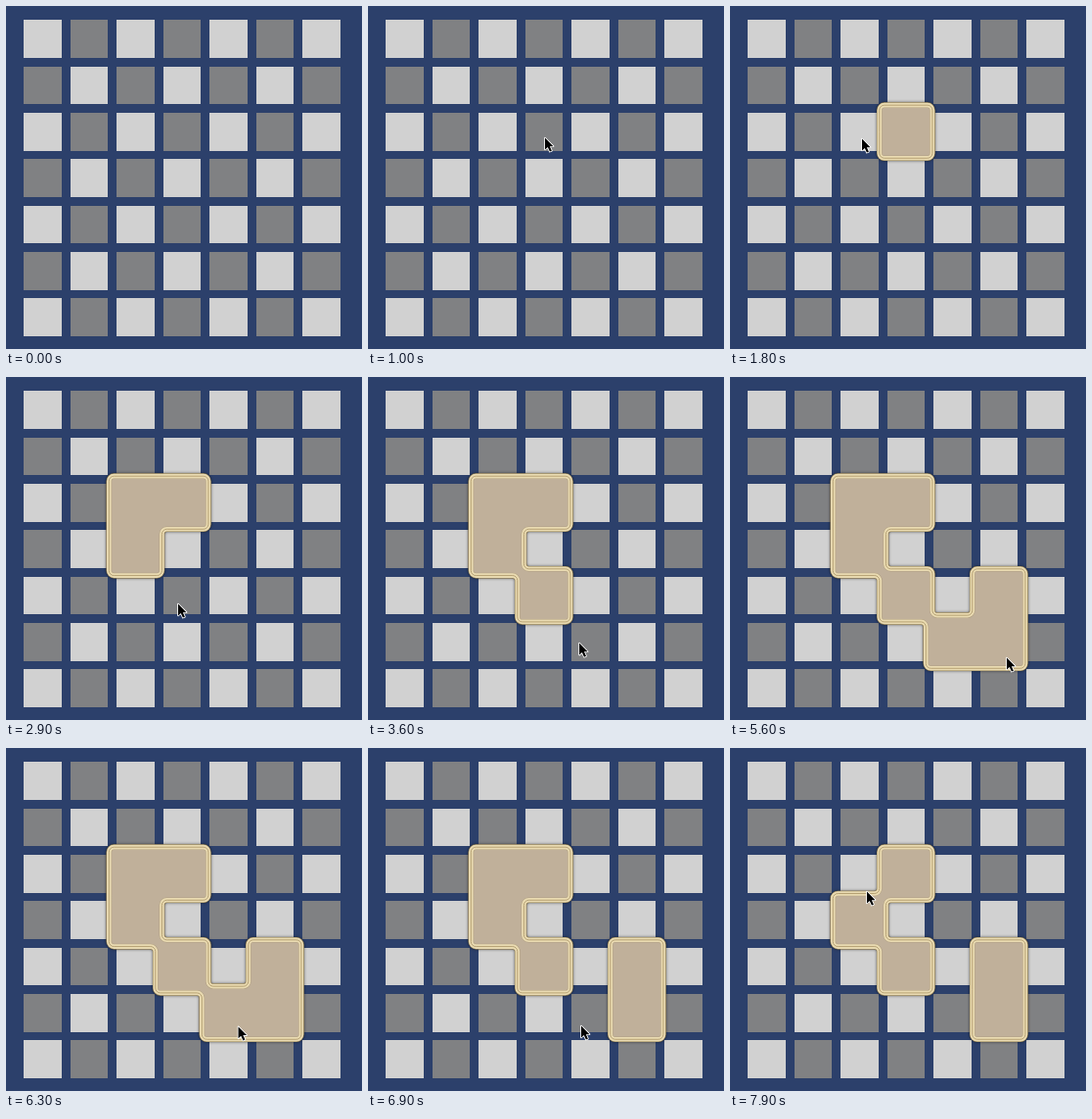
An HTML page with a canvas that plays this animation: 364x350 px, repeating every 8000 ms.

```html
<!DOCTYPE html>
<html lang="en">
<head>
<meta charset="utf-8">
<title>Tile board</title>
<style>
  html, body { margin: 0; width: 100%; height: 100%; overflow: hidden; background: #2c406b; }
  canvas { display: block; }
</style>
</head>
<body>
<canvas id="board" width="364" height="350"></canvas>
<script>
const ctx = document.getElementById('board').getContext('2d');
const LOOP = 8000, STEP = 100;
const SIZE = 38.7, GROW = 7.7, RADIUS = 5;
const X0 = 18, Y0 = 14.2, DX = 47.5, DY = 47.33;
const APPEAR = 600, REST = 200;

// Time and place of each click; a click toggles the tile below it
const clicks = [
  [1200, 180, 133], [2000, 134, 134], [2400, 134, 178],
  [3100, 175, 230], [4000, 225, 280], [4700, 272, 212],
  [5600, 282, 285], [6900, 217, 282], [7900, 139, 145]
];

// Lattice lines: odd numbers are left/top tile edges, even ones right/bottom
const line = (k, start, pitch) => k % 2
  ? start + pitch * (k + 1) / 2 - GROW
  : start + pitch * (k - 2) / 2 + SIZE + GROW;

function tilesAt(t) {
  const on = new Map();
  for (const [time, x, y] of clicks) {
    if (t < time) break;
    const c = Math.floor((x - X0) / DX), r = Math.floor((y - Y0) / DY);
    const key = c + ',' + r;
    if (!on.delete(key)) on.set(key, [c, r]);
  }
  return [...on.values()];
}

function outlines(tiles) {
  const filled = new Set(), next = new Map(), loops = [];
  const key = (a, b) => a + ',' + b;
  for (const [c, r] of tiles)
    for (let a = 2 * c - 1; a < 2 * c + 2; a++)
      for (let b = 2 * r - 1; b < 2 * r + 2; b++) filled.add(key(a, b));

  for (const cell of filled) {
    const [a, b] = cell.split(',').map(Number);
    const edge = (da, db, from, to) => {
      if (!filled.has(key(a + da, b + db))) next.set(from, to);
    };
    const tl = key(a, b), tr = key(a + 1, b), br = key(a + 1, b + 1), bl = key(a, b + 1);
    edge(0, -1, tl, tr);
    edge(1, 0, tr, br);
    edge(0, 1, br, bl);
    edge(-1, 0, bl, tl);
  }

  while (next.size) {
    const loop = [];
    let p = next.keys().next().value;
    while (next.has(p)) {
      const q = next.get(p);
      next.delete(p);
      loop.push(p.split(',').map(Number));
      p = q;
    }
    const n = loop.length;
    loops.push(loop.filter((v, i) => {
      const u = loop[(i + n - 1) % n], w = loop[(i + 1) % n];
      return u[0] !== w[0] && u[1] !== w[1];
    }).map(([a, b]) => [line(a, X0, DX), line(b, Y0, DY)]));
  }
  return loops;
}

function roundedPath(loops) {
  const shape = new Path2D();
  for (const pts of loops) {
    const n = pts.length, last = pts[n - 1];
    shape.moveTo((last[0] + pts[0][0]) / 2, (last[1] + pts[0][1]) / 2);
    pts.forEach((p, i) => shape.arcTo(...p, ...pts[(i + 1) % n], RADIUS));
    shape.closePath();
  }
  return shape;
}

function drawBoard() {
  ctx.fillStyle = '#2c406b';
  ctx.fillRect(0, 0, 364, 350);
  for (let r = 0; r < 7; r++)
    for (let c = 0; c < 7; c++) {
      const x = Math.round(X0 + c * DX), y = Math.round(Y0 + r * DY);
      const right = Math.round(X0 + c * DX + SIZE), bottom = Math.round(Y0 + r * DY + SIZE);
      ctx.fillStyle = (r + c) % 2 ? '#808183' : '#d1d1d1';
      ctx.fillRect(x, y, right - x, bottom - y);
    }
}

function drawTiles(tiles) {
  const shape = roundedPath(outlines(tiles));
  const stroke = (width, color) => {
    ctx.lineWidth = width;
    ctx.strokeStyle = color;
    ctx.stroke(shape);
  };
  ctx.save();
  ctx.shadowColor = 'rgba(0, 0, 0, 0.6)';
  ctx.shadowBlur = 3;
  stroke(5.6, '#8f7c52');
  ctx.restore();
  ctx.fillStyle = '#c0b09a';
  ctx.fill(shape, 'evenodd');
  stroke(5.6, 'rgba(143, 124, 82, 0.35)');
  stroke(4.6, '#eadbb2');
  stroke(1, '#b5a072');
}

const arrow = new Path2D('M0 0V14.6L3.4 11.5L6 17.2L8.4 16.1L5.9 10.6H10.4Z');

function pointerAt(t) {
  const i = clicks.findIndex(c => c[0] > t);
  if (i < 1) return clicks.at(i).slice(1);
  const [t0, x0, y0] = clicks[i - 1], [t1, x1, y1] = clicks[i];
  const k = Math.min(1, (t - t0) / (t1 - REST - t0));
  const s = k * k * (3 - 2 * k);
  return [x0 + (x1 - x0) * s, y0 + (y1 - y0) * s];
}

function drawPointer(t) {
  if (t < APPEAR) return;
  const [x, y] = pointerAt(t);
  ctx.save();
  ctx.translate(x + 1, y + 1.5);
  ctx.scale(0.82, 0.82);
  ctx.lineJoin = 'round';
  ctx.lineWidth = 2;
  ctx.strokeStyle = '#fff';
  ctx.stroke(arrow);
  ctx.fillStyle = '#000';
  ctx.fill(arrow);
  ctx.restore();
}

const begin = performance.now();

function frame(now) {
  const t = Math.floor(Math.max(0, now - begin) % LOOP / STEP) * STEP;
  drawBoard();
  drawTiles(tilesAt(t));
  drawPointer(t);
  requestAnimationFrame(frame);
}
frame(begin);
</script>
</body>
</html>
```
